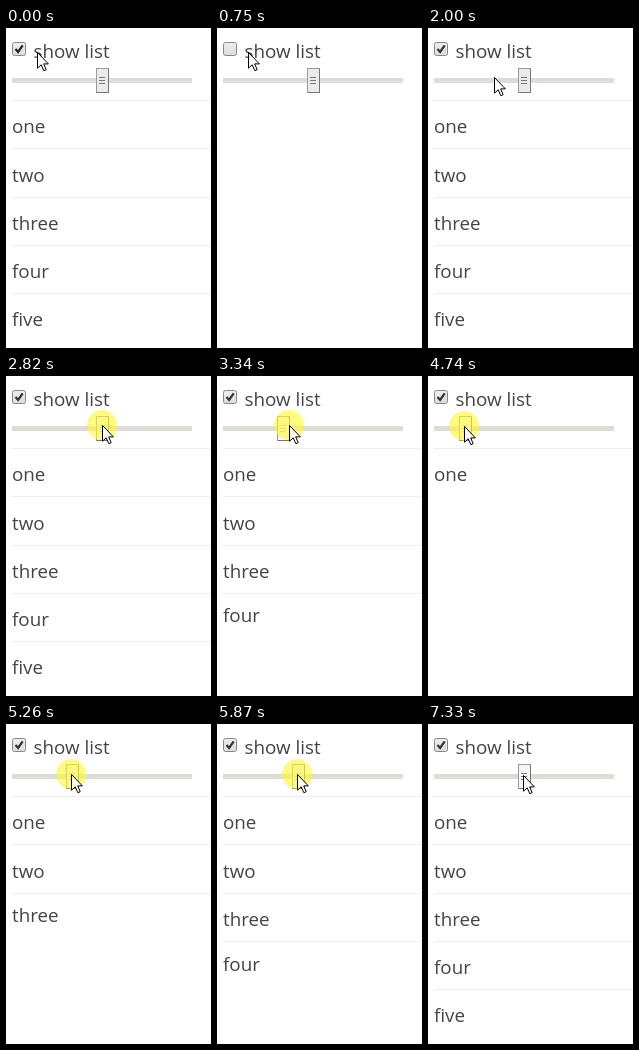
Animation, 205 px wide and 320 px high, one loop 7400 ms. Source, as an HTML page:

```html
<!DOCTYPE html>
<html lang="en">
<head>
<meta charset="utf-8">
<title>Sliding list</title>
<style>
  html, body { margin: 0; width: 100%; height: 100%; overflow: hidden; background: #fff; }
  svg { display: block; }
  text { font: 18.8px "Open Sans", "Noto Sans", sans-serif; fill: #444; }
</style>
</head>
<body>
<svg id="stage" width="205" height="320" viewBox="0 0 205 320">
  <defs>
    <linearGradient id="face" x2="0" y2="1">
      <stop offset="0" stop-color="#eee"/>
      <stop offset="1" stop-color="#dcdcdc"/>
    </linearGradient>
  </defs>
  <rect id="box" x="6.5" y="14.5" width="13" height="13" rx="2" fill="url(#face)" stroke="#888"/>
  <path id="tick" d="M9.5 21l2.6 2.9 4.6-6.6" fill="none" stroke-width="2.2"/>
  <text x="27.5" y="30">show list</text>
  <rect x="6" y="50" width="180" height="5" fill="#dfdcd8"/>
  <g id="thumb">
    <rect id="knob" x="-5.5" y="40.5" width="12" height="24" stroke="#999"/>
    <path d="M-5 64.5H6.5V41" fill="none" stroke="#777"/>
    <path id="grip" d="M-3 49.5h6m-6 3h6m-6 3h6" stroke="#777"/>
  </g>
  <g id="list"></g>
  <circle id="glow" r="15" fill="#fff834" fill-opacity=".62"/>
  <path id="cursor" d="M.5 .5V16.2L4.2 12.8 6.8 18.7 9.2 17.7 6.7 11.9H11.4Z" fill="#fff" stroke="#000"/>
</svg>
<script>
const LOOP = 7400, SLIDE = 400, ROW = 48.3, TOP = 72;
const DRAG = 2820, FRAME = 64.6;      // drag start, length of one picture
const KNOB_X = 96, STEP = 14.8;       // slider position of value 5, distance per value
const WORDS = ['one', 'two', 'three', 'four', 'five'];

// Pointer route: time, x, y
const ROUTE = [
  [1600, 31, 24], [1980, 66, 49], [2560, 96, 49], [DRAG, 96, 49],
  [3280, 73.8, 49], [4112, 46, 50], [4700, 36, 50], [5275, 65.5, 50],
  [5724, 73.8, 50], [6180, 95, 50], [7300, 95, 50], [7340, 95, 51]
];

const $ = id => document.getElementById(id);
const set = (el, attrs) => {
  for (const k in attrs) el.setAttribute(k, attrs[k]);
  return el;
};
const add = (parent, tag, attrs) =>
  parent.appendChild(set(document.createElementNS('http://www.w3.org/2000/svg', tag), attrs));
const show = (el, on) => set(el, { visibility: on ? 'visible' : 'hidden' });
const mix = (a, b, p) => a + (b - a) * p;
const cubicOut = p => 1 - (1 - p) ** 3;
const within = (t, a, b) => t >= a && t < b;

function pointer(t) {
  const i = ROUTE.findIndex(p => p[0] > t);
  if (i < 1) return ROUTE.at(i).slice(1);
  const [t0, x0, y0] = ROUTE[i - 1], [t1, x1, y1] = ROUTE[i];
  const p = (t - t0) / (t1 - t0);
  return [mix(x0, x1, p), mix(y0, y1, p)];
}

// Moments when the drag passes x, and whether it moves right
function crossings(x) {
  const found = [];
  for (let i = 1; i < ROUTE.length; i++) {
    const [t0, x0] = ROUTE[i - 1], [t1, x1] = ROUTE[i];
    if (t0 >= DRAG && (x0 < x) !== (x1 < x))
      found.push({ at: mix(t0, t1, (x - x0) / (x1 - x0)), opens: x1 > x0 });
  }
  return found;
}

const rows = WORDS.map((word, n) => {
  const row = add($('list'), 'svg', { width: 205, overflow: 'hidden' });
  add(row, 'rect', { x: 6, width: 199, height: 1, fill: '#eee' });
  const label = add(row, 'text', { x: 6 });
  label.textContent = word;
  return { row, label, turns: crossings(KNOB_X - STEP * (4.5 - n)) };
});

// How far a row is unfolded, 0 to 1
function openness(turns, t) {
  const turn = turns.filter(c => c.at <= t).pop();
  if (!turn) return 1;
  const e = cubicOut(Math.min(1, (t - turn.at) / SLIDE));
  return turn.opens ? e : 1 - e;
}

function draw(time) {
  // the pose advances in even steps
  const t = DRAG + Math.floor((time - DRAG) / FRAME + .25) * FRAME;
  const [x, y] = pointer(t);
  const checked = !within(time, 690, 1560);
  const dragging = within(time, 2640, 6630);
  const pressed = dragging || within(time, 560, 750) || within(time, 1380, 1625);
  const steps = t < DRAG ? 0 : Math.round((KNOB_X - x) / STEP);
  const spot = [Math.round(x), Math.round(y)];

  show($('tick'), checked);
  set($('tick'), { stroke: time < 1700 ? '#223' : '#333' });
  set($('thumb'), { transform: `translate(${Math.round(KNOB_X - STEP * steps)} 0)` });
  set($('knob'), { fill: time < 2640 ? '#ebebeb' : '#f6f6f4' });
  set($('grip'), { opacity: dragging ? .4 : 1 });
  show($('glow'), pressed);
  set($('glow'), { cx: spot[0], cy: spot[1] });
  set($('cursor'), { transform: `translate(${spot})` });

  $('list').style.display = checked ? '' : 'none';
  let top = TOP;
  for (const { row, label, turns } of rows) {
    const open = openness(turns, t), edge = Math.round(top);
    set(row, { y: edge, height: ROW * open, opacity: Math.min(1, open * 20) });
    row.style.display = open > 0 ? '' : 'none';
    set(label, { y: Math.round(top + 22.2 + 11 * open) - edge });
    top += ROW * open;
  }
}

const start = performance.now();
function tick() {
  draw((performance.now() - start) % LOOP);
  requestAnimationFrame(tick);
}
tick();
</script>
</body>
</html>
```
